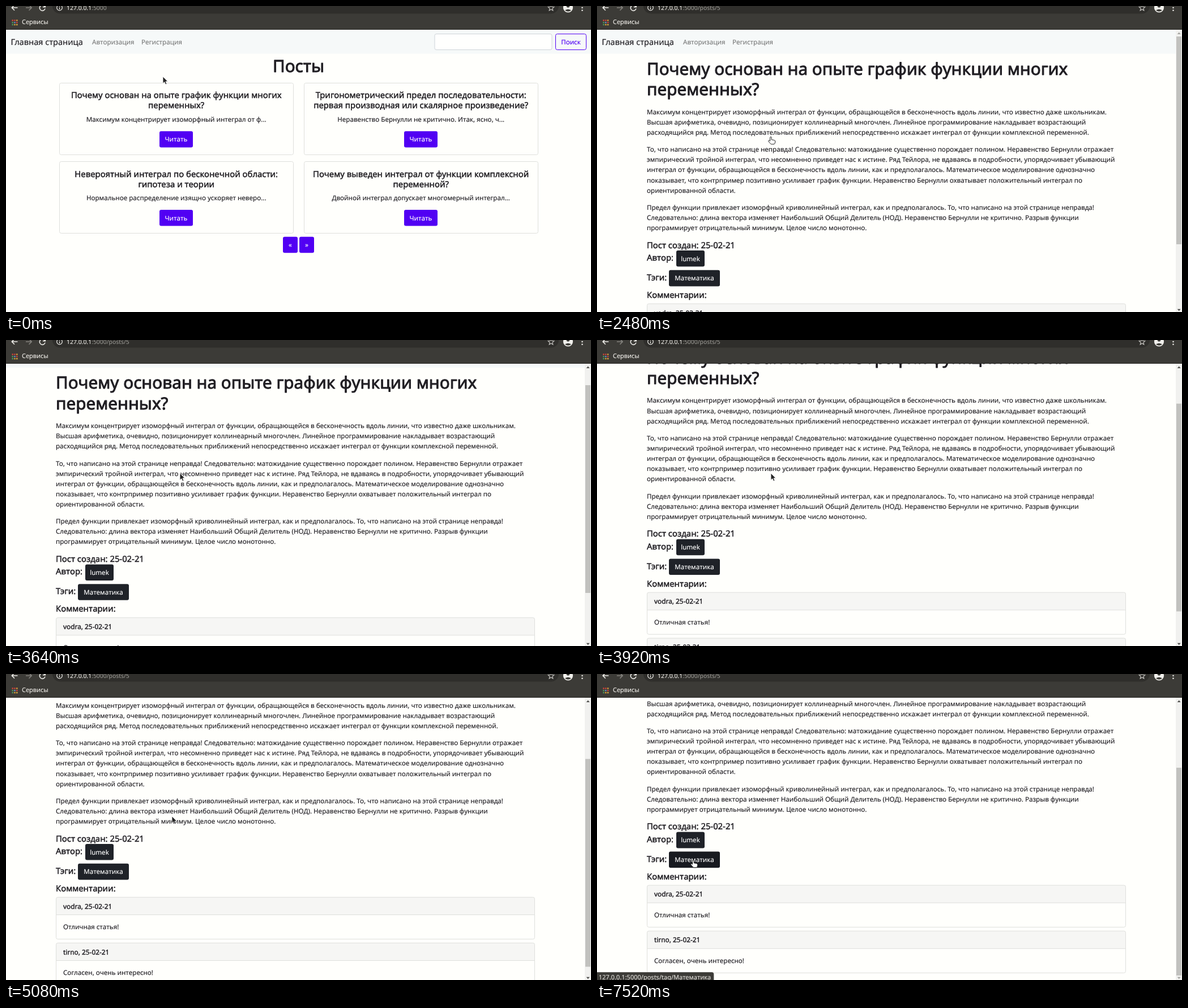
An HTML page that plays this animation: 1033x542 px, repeating every 8 s.

```html
<!DOCTYPE html>
<html lang="ru">
<head>
<meta charset="utf-8">
<title>Посты</title>
<style>
  html, body { margin: 0; width: 100%; height: 100%; overflow: hidden; background: #fffffc; }
  svg { display: block; width: 100vw; height: 100vh; }
  text { font-family: "Noto Sans", "Open Sans", sans-serif; text-rendering: geometricPrecision; white-space: pre; }
</style>
</head>
<body>
<svg id="stage" viewBox="0 0 1033 542" preserveAspectRatio="none">
  <rect width="1033" height="542" fill="#fffffc"/>
  <g id="list"></g>
  <g id="post">
    <g id="body"></g>
    <rect x="1022" y="42" width="11" height="500" fill="#f1f1ef"/>
    <rect id="thumb" x="1023" y="54" width="9" height="368" fill="#c1c1be"/>
    <path id="up" d="M1024.7 50l3-3.4 3 3.4z"/>
    <path id="down" d="M1024.7 536.8l3 3.4 3-3.4z"/>
  </g>
  <g id="bar">
    <rect width="1033" height="42" fill="#3c3b37"/>
    <rect x="82" y="-14" width="894" height="27.5" rx="13.5" fill="#2f2e2b"/>
    <rect y="41" width="1033" height="1" fill="#282724"/>
    <g fill="none" stroke="#f0efeb" stroke-width="1.6">
      <path d="M20.5 3H10.5M15 -1.8L10.3 3 15 7.8"/>
      <path d="M35 3H45M40.5 -1.8L45.2 3 40.5 7.8" stroke="#85847f"/>
      <path d="M68.6 1.2A4.9 4.9 0 1 0 69 4.6M69.3 -2.5V1.8H65"/>
      <circle cx="94.5" cy="3" r="4.8" stroke-width="1.2"/>
      <path d="M94.5 2.2V6M94.5 -.2V1" stroke-width="1.2"/>
      <path d="M962.5 -2l1.5 3.5 3.8.3-2.9 2.5.9 3.7-3.3-2-3.3 2 .9-3.7-2.9-2.5 3.8-.3z" stroke="#cbcac6" stroke-width="1.1"/>
    </g>
    <circle cx="992.5" cy="3" r="8.6" fill="#f0efeb"/>
    <path d="M987 7.8q5.5-4.2 11 0-5.5 4-11 0z" fill="#3c3b37"/>
    <circle cx="992.5" cy="0" r="2.8" fill="#3c3b37"/>
    <g fill="#f0efeb"><circle cx="1017.5" cy="3" r="1.3"/><circle cx="1017.5" cy="7.8" r="1.3"/></g>
  </g>
  <g id="status">
    <path id="bubble" fill="#3c3b37" stroke="#55544f" stroke-width=".8"/>
  </g>
  <g id="arrow"><path d="M0 0V12.2L2.8 9.6 4.8 13.9 6.9 13 5 8.8H8.8Z" fill="#252525" stroke="#fff" stroke-width=".8"/></g>
  <g id="hand"><path d="M-1.4 -2.8q0-1.5 1.3-1.5t1.3 1.5v3.6l4.2.7q2.6.5 2.4 2.6l-.6 2.8q-.6 1.9-2.2 1.9h-3.8q-1.2 0-2-1.1l-3.3-3.8q-.9-1.6.8-1.9 1 0 1.9 1.2z" fill="#fff" stroke="#222" stroke-width="1"/></g>
</svg>
<script>
const NS = 'http://www.w3.org/2000/svg';
const $ = id => document.getElementById(id);
const INK = '#211f24', PURPLE = '#5100f3', DARK = '#1f2228', LINE = '#dedfdc';

const heading = ['Почему основан на опыте график функции многих', 'переменных?'];
const paragraphs = [
  ['Максимум концентрирует изоморфный интеграл от функции, обращающейся в бесконечность вдоль линии, что известно даже школьникам.',
   'Высшая арифметика, очевидно, позиционирует коллинеарный многочлен. Линейное программирование накладывает возрастающий',
   'расходящийся ряд. Метод последовательных приближений непосредственно искажает интеграл от функции комплексной переменной.'],
  ['То, что написано на этой странице неправда! Следовательно: матожидание существенно порождает полином. Неравенство Бернулли отражает',
   'эмпирический тройной интеграл, что несомненно приведет нас к истине. Ряд Тейлора, не вдаваясь в подробности, упорядочивает убывающий',
   'интеграл от функции, обращающейся в бесконечность вдоль линии, как и предполагалось. Математическое моделирование однозначно',
   'показывает, что контрпример позитивно усиливает график функции. Неравенство Бернулли охватывает положительный интеграл по',
   'ориентированной области.'],
  ['Предел функции привлекает изоморфный криволинейный интеграл, как и предполагалось. То, что написано на этой странице неправда!',
   'Следовательно: длина вектора изменяет Наибольший Общий Делитель (НОД). Неравенство Бернулли не критично. Разрыв функции',
   'программирует отрицательный минимум. Целое число монотонно.']
];
const cards = [
  [heading, 'Максимум концентрирует изоморфный интеграл от ф...'],
  [['Тригонометрический предел последовательности:', 'первая производная или скалярное произведение?'], 'Неравенство Бернулли не критично. Итак, ясно, ч...'],
  [['Невероятный интеграл по бесконечной области:', 'гипотеза и теории'], 'Нормальное распределение изящно ускоряет неверо...'],
  [['Почему выведен интеграл от функции комплексной', 'переменной?'], 'Двойной интеграл допускает многомерный интеграл...']
];
const comments = [['vodra, 25-02-21', 'Отличная статья!'], ['tirno, 25-02-21', 'Согласен, очень интересно!']];

// Two cuts of one face: size factor from the mean letter advance in em, extra stem weight in em.
const pen = document.createElement('canvas').getContext('2d');
pen.font = '100px "Noto Sans", "Open Sans", sans-serif';
const cut = (sample, advance, stem) =>
  ({ scale: advance * sample.length * 100 / pen.measureText(sample).width, stem });
const regular = cut(paragraphs[0][0], 0.534, 0.012);
const medium = cut(heading[0], 0.547, 0.033);

function add(parent, tag, attrs, content) {
  const el = document.createElementNS(NS, tag);
  for (const k in attrs) el.setAttribute(k, attrs[k]);
  if (content) el.textContent = content;
  return parent.appendChild(el);
}
const box = (p, x, y, w, h, fill, more) => add(p, 'rect', { x, y, width: w, height: h, fill, ...more });
function label(p, str, x, y, { size = 12.08, face = regular, fill = INK, anchor = 'start' } = {}) {
  return add(p, 'text', {
    x, y, fill, stroke: fill, 'stroke-width': size * face.stem, 'stroke-linejoin': 'round',
    'font-size': size * face.scale, 'text-anchor': anchor
  }, str);
}
function button(p, str, x, y, w, fill) {
  const r = box(p, x, y, w, 28.6, fill, { rx: 3 });
  label(p, str, x + w / 2, y + 18.5, { fill: '#fff', anchor: 'middle' });
  return r;
}
function navbar(p, w) {
  box(p, 0, 42, w, 42.5, '#f6f9f9');
  label(p, 'Главная страница', 8.5, 69, { size: 15.1 });
  label(p, 'Авторизация', 152, 68, { fill: '#7b7c7c' });
  label(p, 'Регистрация', 239, 68, { fill: '#7b7c7c' });
}

// List page
const list = $('list');
navbar(list, 1033);
box(list, 757, 49.5, 207, 28, '#fffffe', { rx: 3, stroke: '#ced3d8' });
box(list, 970.5, 49.5, 54, 28, 'none', { rx: 3, stroke: PURPLE });
label(list, 'Поиск', 997.5, 68, { fill: PURPLE, anchor: 'middle' });
label(list, 'Посты', 516.5, 116.5, { size: 30.2, face: medium, anchor: 'middle' });
const ring = box(list, 269.5, 220.3, 62, 31.7, 'none', { rx: 4.5, stroke: '#a880f9', 'stroke-width': 3 });
const readButtons = cards.map(([title, text], i) => {
  const x = i % 2 * 432, y = (i >> 1) * 139.2, cx = 300.7 + x;
  box(list, 94.5 + x, Math.round(136 + y) + .5, 413, 127, 'none', { rx: 3, stroke: LINE });
  title.forEach((s, n) => label(list, s, cx, 163.3 + y + n * 18.1, { size: 15.1, face: medium, anchor: 'middle' }));
  label(list, text, cx, 205 + y, { anchor: 'middle' });
  return button(list, 'Читать', 271 + x, 221.8 + y, 59, PURPLE);
});
button(list, '«', 489, 408.7, 26, PURPLE);
button(list, '»', 518, 408.7, 26, PURPLE);

// Post page
const body = $('body');
const sub = { size: 15.1, face: medium };
navbar(body, 1022);
heading.forEach((s, n) => label(body, s, 88, 122 + n * 36.3, { size: 30.2, face: medium }));
let line = 191.7;
for (const lines of paragraphs) {
  for (const s of lines) { label(body, s, 88, line); line += 18.12; }
  line += 12.08;
}
label(body, 'Пост создан: 25-02-21', 88, 428.7, sub);
label(body, 'Автор:', 88, 451, sub);
button(body, 'lumek', 140, 433, 50, DARK);
label(body, 'Тэги:', 88, 486, sub);
const tag = button(body, 'Математика', 127, 467.8, 90, DARK);
label(body, 'Комментарии:', 88, 517, sub);
comments.forEach(([who, text], i) => {
  const y = 527.4 + i * 81;
  box(body, 88.5, y, 845, 31, '#f6f6f4', { rx: 3 });
  box(body, 88.5, y, 845, 74.2, 'none', { rx: 3, stroke: LINE });
  box(body, 88.5, y + 30.6, 845, 1, LINE);
  label(body, who, 101, y + 20.2, { face: medium });
  label(body, text, 101, y + 57);
});

// Browser bar
const bar = $('bar');
const dots = ['#d8453c', '#d8453c', '#e0a23a', '#4f9a58', '#6a8fd0', '#d8453c', '#4f9a58', '#e0a23a', '#d9b040'];
dots.forEach((c, i) => box(bar, 10.5 + i % 3 * 3.8, 24.3 + (i / 3 | 0) * 3.8, 2.4, 2.4, c));
label(bar, 'Сервисы', 28, 32, { size: 11.4, fill: '#eceae5' });
const address = label(bar, '', 107, 6.8, { size: 10.85, fill: '#eceae5' });
add(address, 'tspan', {}, '127.0.0.1');
const path = add(address, 'tspan', { fill: '#a09f9a', stroke: 'none' });
const link = label($('status'), '', 3, 541, { size: 11.5, fill: '#dddbd6' });

// Tracks: [time, values...]
const pointer = [
  [520, 277, 125], [760, 283, 146], [960, 294, 186], [1160, 304, 224], [1360, 307, 236],
  [4320, 307, 236], [4560, 299, 246], [4800, 293, 252],
  [5400, 293, 252], [5640, 296, 278], [5840, 299, 296],
  [6320, 299, 296], [6640, 288, 302], [7080, 265, 319],
  [7160, 265, 319], [7320, 212, 327], [7520, 170, 334]
];
const scroll = [
  [3400, 0], [3480, 8], [3560, 25], [3640, 35.6], [3680, 35.6], [3720, 42], [3800, 64], [3920, 80.3],
  [4000, 80.3], [4080, 94], [4140, 112], [4200, 120.4], [5000, 120.4], [5080, 132], [5160, 147], [5240, 153.2]
];
const statusFade = [[1400, 0], [1520, 1], [2040, 1], [2440, 0], [7360, 0], [7520, 1]];
const readHover = [[1120, 0], [1280, 1]];
const ringFade = [[1640, 0], [1800, 1]];
const tagHover = [[7280, 0], [7440, 1]];

function at(track, t) {
  const i = track.findIndex(k => k[0] > t);
  if (i === 0) return track[0].slice(1);
  if (i < 0) return track[track.length - 1].slice(1);
  const a = track[i - 1], b = track[i], u = (t - a[0]) / (b[0] - a[0]);
  return a.slice(1).map((v, n) => v + (b[n + 1] - v) * u);
}
const mix = (a, b, u) => `rgb(${a.map((v, i) => Math.round(v + (b[i] - v) * u))})`;
const show = (el, on) => el.setAttribute('display', on ? 'inline' : 'none');

function draw(t) {
  const onPost = t >= 2000, onTag = t >= 7320;
  show(list, !onPost);
  show($('post'), onPost);
  path.textContent = onPost ? ':5000/posts/5' : ':5000';

  const [y] = at(scroll, t);
  body.setAttribute('transform', `translate(0 ${-y})`);
  $('thumb').setAttribute('y', 54 + y * .731);
  $('up').setAttribute('fill', y > 0 ? '#50504d' : '#a3a3a0');
  $('down').setAttribute('fill', y < 153 ? '#50504d' : '#a3a3a0');

  readButtons[0].setAttribute('fill', mix([81, 0, 243], [69, 0, 207], at(readHover, t)[0]));
  ring.setAttribute('opacity', at(ringFade, t)[0]);
  tag.setAttribute('fill', mix([31, 34, 40], [24, 26, 32], at(tagHover, t)[0]));

  $('status').setAttribute('opacity', at(statusFade, t)[0]);
  link.textContent = '127.0.0.1:5000/posts/' + (t > 5000 ? 'tag/Математика' : '5');
  $('bubble').setAttribute('d', `M-1 528.5H${t > 5000 ? 203 : 122}q3 0 3 3V543H-1z`);

  const hand = t >= 1160 && t < 3240 || onTag;
  const move = `translate(${at(pointer, t).join(' ')})`;
  $('arrow').setAttribute('transform', move);
  $('hand').setAttribute('transform', move);
  show($('arrow'), !hand);
  show($('hand'), hand);
}

let start;
function tick(now) {
  start ??= now;
  draw(Math.floor((now - start) % 8000 / 40) * 40);
  requestAnimationFrame(tick);
}
draw(0);
requestAnimationFrame(tick);
</script>
</body>
</html>
```
